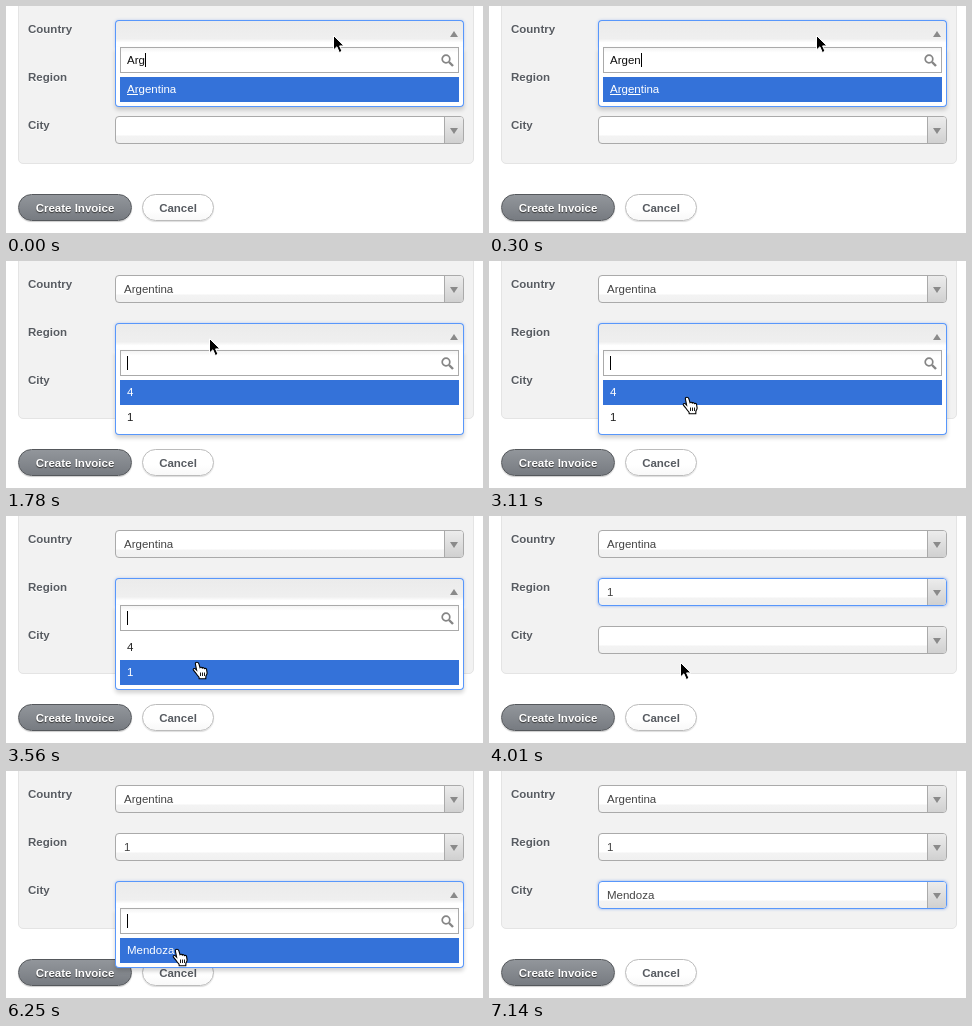
An HTML page that plays this animation: 477x227 px, repeating every 8.04 s.

```html
<!DOCTYPE html>
<html lang="en">
<head>
<meta charset="utf-8">
<title>Linked select boxes</title>
<style>
  * { box-sizing: border-box; }
  html, body { margin: 0; width: 100%; height: 100%; overflow: hidden; background: #fff; }
  body { position: relative; font: 11.5px/28px "Liberation Sans", Arial, sans-serif; color: #444; }
  body div, body svg { position: absolute; white-space: pre; }
  .panel { left: 12px; top: -10px; width: 456px; height: 168px; background: #f2f2f2; border: 1px solid #e4e4e4; border-radius: 5px; }
  .label { left: 22px; font-weight: bold; color: #575b61; text-shadow: 0 1px #fff; }

  .button { top: 188px; height: 27px; border: 1px solid; border-radius: 14px; font-weight: bold; line-height: 26px; text-align: center; }
  .create { left: 12px; width: 114px; color: #fff; border-color: #55585c; background: linear-gradient(#92969b, #777b81); text-shadow: 0 1px 1px #333; box-shadow: 0 1px 1px #ccc; }
  .cancel { left: 136px; width: 72px; color: #575b61; border-color: #bbb; background: linear-gradient(#fff 60%, #f8f8f8); box-shadow: 0 1px 1px #ddd; }

  .field { left: 109px; width: 349px; height: 28px; }
  .box { inset: 0; border: 1px solid #aaa; border-radius: 4px; padding-left: 8px; line-height: 27px; background: linear-gradient(#fff 68%, #f3f3f3 74%, #f1f1f1); }
  .handle { right: 0; top: 0; width: 19px; height: 26px; border-left: 1px solid #aaa; border-radius: 0 3px 3px 0; background: linear-gradient(#ececec, #d0d0d0); }
  .handle::after { content: ""; position: absolute; left: 5px; top: 11px; border: 4px solid transparent; border-width: 6px 4px 0; border-top-color: #8a8a8a; }
  .focus .box { border-color: #5897fb; box-shadow: 0 0 3px rgba(50, 110, 230, .55); }
  .open { z-index: 1; }
  .open .box { border-color: #5897fb; border-bottom: 0; border-radius: 4px 4px 0 0; background: linear-gradient(#ebebeb, #efefef 66%, #fff 80%); box-shadow: 0 0 3px rgba(50, 110, 230, .3); }
  .open .handle { border: 0; background: none; }
  .open .handle::after { left: 6px; top: 10px; border-width: 0 4px 6px; border-color: transparent transparent #8a8a8a; }

  .drop { display: none; left: 0; top: 27px; width: 349px; background: #fff; border: 1px solid #5897fb; border-top: 0; border-radius: 0 0 4px 4px; box-shadow: 0 3px 4px rgba(0, 0, 0, .18); }
  .open .drop { display: block; }
  .search { left: 4px; top: 0; width: 339px; height: 26px; border: 1px solid #aaa; padding-left: 6px; line-height: 25px; color: #111; background: linear-gradient(#f4f4f4, #fff 20%); }
  .caret { display: inline-block; width: 1px; height: 14px; background: #000; vertical-align: -3px; }
  .row { left: 4px; width: 339px; height: 25px; padding-left: 7px; line-height: 25px; color: #222; }
  .row.on { background: #3472d9; color: #fff; }
  .cursor { display: none; z-index: 2; left: 0; top: 0; overflow: visible; }
</style>
</head>
<body>
<div class="panel"></div>
<div class="button create">Create Invoice</div>
<div class="button cancel">Cancel</div>

<svg class="cursor" id="arrow" width="12" height="18">
  <path d="M.5 .5V15L3.9 11.8 6.3 17.5 9 16.3 6.6 10.9H11Z" fill="#000" stroke="#fff"/>
</svg>
<svg class="cursor" id="hand" width="16" height="18">
  <g transform="translate(-5 -1)" stroke="#000" stroke-width="1.1">
    <path fill="#fff" d="M5 1.2c1 0 1.6.6 1.9 1.6L8 6.6c.5-.6 2-.5 2.3.4.6-.6 1.9-.4 2.2.6.8-.5 2 0 2.1 1l.5 3.2c.2 1.5-.9 2.5-1.2 3.4l-.1 2.6H7.2L7 16.2C5.8 15 4.6 13.4 3.6 11.8L1.4 9.1c-.6-.9.6-2.3 2-1.2l1.2 1.2L3.4 3c-.2-1 .5-1.8 1.6-1.8z"/>
    <path d="M8.5 11.5v3.5M10.5 11.5v3.5M12.5 11.5v3.5" stroke-width=".9"/>
  </g>
</svg>
<svg class="cursor" id="beam" width="7" height="16">
  <path d="M-3-7.5Q0-7.5 0-5.5Q0-7.5 3-7.5M0-5.5V5.5M-3 7.5Q0 7.5 0 5.5Q0 7.5 3 7.5" fill="none" stroke="#222"/>
</svg>

<script>
const LOOP = 8040;

// Each field opens, closes on a chosen value, then loses focus.
const fields = [
  { name: "Country", open: 0, close: 750, blur: 1630, value: "Argentina", rows: ["Argentina"] },
  { name: "Region", open: 1630, close: 4010, blur: 4300, value: "1", rows: ["4", "1"] },
  { name: "City", open: 4300, close: 6400, blur: LOOP, value: "Mendoza", rows: ["Mendoza"] }
];

const typing = [[0, "Arg"], [150, "Arge"], [300, "Argen"]];
const caretOff = [[2230, 2670], [3260, 3560], [4900, 5350], [5950, 6250]];
const secondRowAt = 3410;

const pointer = [
  [0, "arrow", 327, 29],
  [750, "hand", 325, 30], [890, "hand", 291, 45], [1040, "hand", 222, 73], [1190, "hand", 203, 77],
  [1780, "arrow", 203, 77], [2670, "arrow", 203, 81], [2820, "beam", 202, 102],
  [2960, "hand", 200, 126], [3110, "hand", 198, 136], [3260, "hand", 196, 140],
  [3410, "hand", 193, 144], [3560, "hand", 191, 146],
  [4010, "arrow", 191, 146], [4160, "hand", 187, 136], [4300, "hand", 184, 131],
  [4450, "arrow", 184, 130], [5200, "beam", 180, 152], [5350, "hand", 174, 173], [5500, "hand", 171, 178],
  [6400, "arrow", 169, 177], [6690, "arrow", 190, 180], [6840, "arrow", 260, 190],
  [6990, "arrow", 352, 201], [7140, "none", 0, 0]
];

const at = (steps, t) => steps.findLast(step => step[0] <= t);

function add(parent, className, text = "") {
  const el = document.createElement("div");
  el.className = className;
  el.textContent = text;
  parent.append(el);
  return el;
}

fields.forEach((f, i) => {
  const top = 14 + 48 * i;
  add(document.body, "label", f.name).style.top = top - 5 + "px";
  f.el = add(document.body, "field");
  f.el.style.top = top + "px";
  const box = add(f.el, "box");
  f.text = add(box, "text");
  add(box, "handle");

  const drop = add(f.el, "drop");
  drop.style.height = 35 + 25 * f.rows.length + "px";
  const search = add(drop, "search");
  f.typed = document.createElement("span");
  f.caret = document.createElement("span");
  f.caret.className = "caret";
  search.append(f.typed, f.caret);
  search.insertAdjacentHTML("beforeend",
    `<svg style="left:319px;top:5px" width="16" height="16" fill="none" stroke="#858585">
      <circle cx="6" cy="6" r="3.8" stroke-width="1.7"/><path d="M9 9l4 4" stroke-width="2.4"/></svg>`);
  f.rowEls = f.rows.map((row, n) => {
    const el = add(drop, "row", row);
    el.style.top = 30 + 25 * n + "px";
    return el;
  });
});

const [country, region] = fields;
const match = document.createElement("u");
const rest = document.createElement("span");
country.rowEls[0].replaceChildren(match, rest);

function draw(t) {
  const caretOn = !caretOff.some(([from, to]) => t >= from && t < to);
  for (const f of fields) {
    const closed = t >= f.close;
    f.el.classList.toggle("open", t >= f.open && !closed);
    f.el.classList.toggle("focus", closed && t < f.blur);
    f.text.textContent = closed ? f.value : "";
    f.caret.style.visibility = caretOn ? "" : "hidden";
    const active = f === region && t >= secondRowAt ? 1 : 0;
    f.rowEls.forEach((el, n) => el.classList.toggle("on", n === active));
  }

  const query = at(typing, t)[1];
  country.typed.textContent = match.textContent = query;
  rest.textContent = country.value.slice(query.length);

  const [, shape, x, y] = at(pointer, t);
  for (const el of document.querySelectorAll(".cursor")) {
    el.style.display = el.id === shape ? "block" : "none";
    el.style.transform = `translate(${x}px, ${y}px)`;
  }
}

const start = performance.now();
function tick() {
  draw((performance.now() - start) % LOOP);
  requestAnimationFrame(tick);
}
tick();
</script>
</body>
</html>
```
